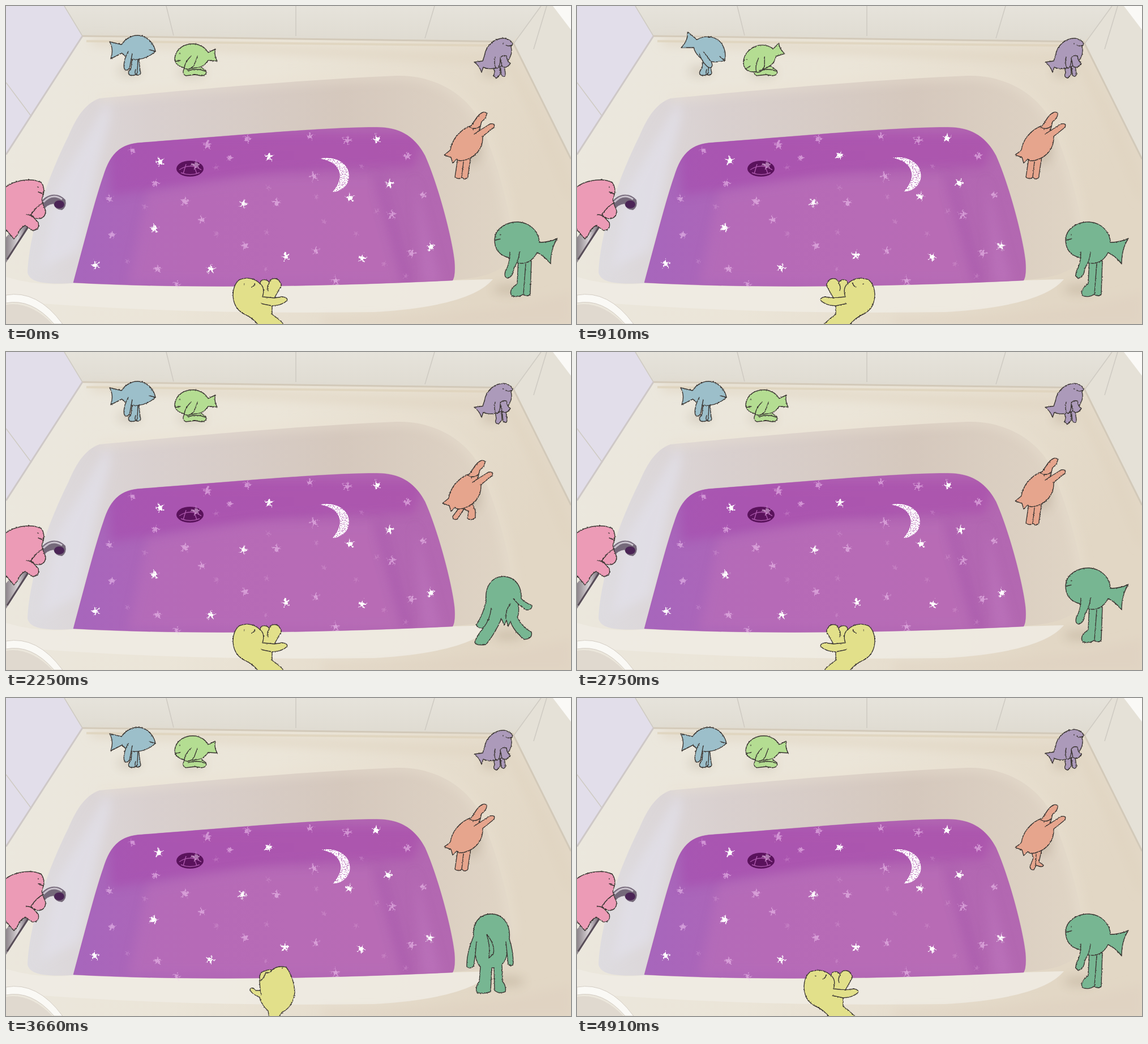
These frames come from a looping animation (998x561 px, 5000 ms). An HTML page:

```html
<!DOCTYPE html>
<html lang="en">
<head>
<meta charset="utf-8">
<title>Fish bath</title>
<style>
  html, body { margin: 0; width: 100%; height: 100%; overflow: hidden; background: #e9e3d5 }
  svg { display: block; width: 100%; height: 100% }
  .fish { stroke: #3b3633; stroke-width: 1.4; stroke-linejoin: round; stroke-linecap: round; filter: url(#rough) }
  .l { fill: none }
  .soft { filter: url(#blur) }
  .grout { fill: none; stroke: #cfcbc3; stroke-width: 1.6 }
</style>
</head>
<body>
<svg viewBox="0 0 998 561" preserveAspectRatio="none">
  <defs>
    <filter id="rough"><feTurbulence id="boil" type="fractalNoise" baseFrequency=".4" result="n"/><feDisplacementMap in="SourceGraphic" in2="n" scale="2.8" xChannelSelector="R" yChannelSelector="G"/></filter>
    <filter id="still"><feTurbulence type="fractalNoise" baseFrequency=".3" result="n"/><feDisplacementMap in="SourceGraphic" in2="n" scale="8" xChannelSelector="R" yChannelSelector="G"/></filter>
    <filter id="scribble"><feTurbulence id="wobble" type="fractalNoise" baseFrequency=".3" result="n"/><feDisplacementMap in="SourceGraphic" in2="n" scale="8" xChannelSelector="R" yChannelSelector="G"/></filter>
    <filter id="chalk" color-interpolation-filters="sRGB"><feTurbulence id="grain" type="fractalNoise" baseFrequency=".55"/><feColorMatrix values="0 0 0 0 1  0 0 0 0 1  0 0 0 0 1  7 0 0 0 -2.3"/><feComposite in2="SourceGraphic" operator="in"/></filter>
    <filter id="blur" x="-30%" y="-30%" width="160%" height="160%"><feGaussianBlur stdDeviation="9"/></filter>
    <linearGradient id="rim" x2="1" y2=".25"><stop stop-color="#ebe8df"/><stop offset=".5" stop-color="#ebe5d8"/><stop offset="1" stop-color="#e2d7c5"/></linearGradient>
    <linearGradient id="tub"><stop stop-color="#dedce0"/><stop offset=".25" stop-color="#d9d0cf"/><stop offset=".65" stop-color="#d5c8bd"/><stop offset="1" stop-color="#e0d5c5"/></linearGradient>
    <linearGradient id="water"><stop stop-color="#a766bc"/><stop offset=".35" stop-color="#b065b6"/><stop offset="1" stop-color="#b368b1"/></linearGradient>
    <linearGradient id="wall" y2="1" x2="0"><stop stop-color="#e6e3db"/><stop offset="1" stop-color="#dfdbd1"/></linearGradient>
    <linearGradient id="metal"><stop stop-color="#8d858b"/><stop offset=".5" stop-color="#d8d3d6"/><stop offset="1" stop-color="#5e5260"/></linearGradient>
    <path id="pool" d="M119,488C140,410 158,340 172,300C183,265 198,243 240,241C400,229 560,214 655,214C700,214 724,234 740,264C763,315 788,410 792,450Q794,475 789,484C560,495 320,499 119,488Z"/>
    <clipPath id="inPool"><use href="#pool"/></clipPath>
  </defs>

  <rect width="998" height="561" fill="url(#rim)"/>
  <path d="M100,0H960L895,63L135,53Z" fill="url(#wall)"/>
  <path d="M0,0H103L135,53L0,262Z" fill="#e2deea"/>
  <path d="M945,0H998V270L897,66Z" fill="#e5e1d7"/>
  <path d="M966,0H998V42Z" fill="#faf9f6"/>
  <path class="grout" d="M283,0L296,52M512,0V53M757,0L740,57M945,0L897,66M932,76L955,0M0,135L45,195M103,0L135,53"/>
  <path d="M135,53L895,63L998,270" fill="none" stroke="#d2c9b9" stroke-width="3"/>
  <path d="M135,53L0,262" fill="none" stroke="#cec8c7" stroke-width="3"/>
  <path d="M150,63C300,66 700,88 885,96C920,150 960,240 998,340" fill="none" stroke="#dfd3bf" stroke-width="9" class="soft"/>
  <path d="M142,62L880,70" stroke="#ded2ba" stroke-width="4" opacity=".7"/>
  <path d="M165,163C300,150 520,130 690,123C750,121 808,150 836,200C866,270 892,360 895,420C895,462 860,478 795,483L119,489C75,491 42,490 38,470C40,420 60,330 110,230C125,195 140,172 165,163Z" fill="url(#tub)"/>
  <path d="M165,163C300,150 520,130 690,123C750,121 808,150 836,200C866,270 892,360 895,420" fill="none" stroke="#eae1d2" stroke-width="7" class="soft"/>
  <path d="M180,165L185,195L160,290L130,430L60,465L90,320Z" fill="#e2e0e9" opacity=".75" class="soft"/>
  <path d="M0,478Q60,496 119,489C320,499 560,495 789,484L860,482Q820,530 650,540Q300,545 0,520Z" fill="#f0ede4" opacity=".85"/>
  <path d="M560,552Q820,555 998,505V561H560Z" fill="#e0d3c2" class="soft"/>

  <use href="#pool" fill="url(#water)"/>
  <g clip-path="url(#inPool)">
    <path d="M180,225H740L720,285Q480,285 250,325L185,335Z" fill="#a441a8" opacity=".42" class="soft"/>
    <path d="M250,330L440,300L655,300L700,490H215Z" fill="#be72b9" opacity=".45" class="soft"/>
    <path d="M655,300L710,490" fill="none" stroke="#a553ab" stroke-width="12" opacity=".5" class="soft"/>
    <path d="M720,300L770,490H735Z" fill="#bd76bd" opacity=".6" class="soft"/>
  </g>
  <use href="#pool" fill="none" stroke="#a247a9" opacity=".4"/>
  <ellipse cx="325" cy="287" rx="24" ry="14" fill="#5a125c"/>
  <path d="M306,289Q325,276 345,289M309,294Q325,301 342,294M318,279L313,296M331,278L337,296" fill="none" stroke="#a855a8" stroke-width="1.5"/>
  <g id="faint" fill="#f3c8f2" filter="url(#still)"></g>
  <g id="bright" fill="#fff" filter="url(#scribble)"></g>
  <g filter="url(#chalk)"><path id="moon" fill="#fff" d="M555,269C580,264 606,276 606,300C606,316 592,328 577,328C590,312 594,298 585,285C578,275 567,272 555,269Z"/></g>

  <g fill="#806a50" opacity=".22" class="soft">
    <ellipse cx="218" cy="115" rx="20" ry="8"/><ellipse cx="328" cy="117" rx="24" ry="8"/><ellipse cx="858" cy="116" rx="18" ry="8"/>
    <ellipse cx="822" cy="254" rx="15" ry="26"/><ellipse cx="888" cy="500" rx="28" ry="8"/>
  </g>
  <path d="M0,510Q55,500 100,561H85Q45,515 0,524Z" fill="#faf9f5" stroke="#d3ccc3"/>
  <path d="M0,527Q42,520 82,561H0Z" fill="#e0d9cf"/>
  <path d="M0,408L30,375L42,388L0,453Z" fill="url(#metal)"/>
  <path d="M40,388L2,447" stroke="#574c57" stroke-width="3"/>
  <path d="M58,352C68,330 92,327 105,342Q108,354 99,360Q87,360 84,349Q71,350 66,362Z" fill="#75697a"/>
  <path d="M66,346Q82,329 99,341" fill="none" stroke="#c9c2cc" stroke-width="3"/>
  <ellipse cx="94" cy="350" rx="9" ry="7" fill="#4b2456"/>

  <g id="pink" class="fish" fill="#ec9bb6">
    <path d="M-6,324C12,306 45,303 62,311Q69,320 66,333C60,343 66,350 70,361Q70,373 60,375Q52,377 44,368L57,382Q60,395 47,396L34,387Q24,392 20,404L14,411L-6,388Z"/>
    <path class="l" d="M66,332L57,328M57,319v1M66,347Q55,352 44,368M36,368Q44,368 46,372"/>
  </g>

  <g id="blue" class="fish" fill="#9cbfca">
    <path d="M223,88L221,109Q213,119 219,122Q228,124 232,118L233,90ZM229,112Q226,121 232,122Q240,122 237,114L234,90"/>
    <g><path d="M204,68C214,53 232,48 246,55Q261,64 264,80C254,89 241,96 222,94Q210,90 205,83L185,93Q191,77 183,63Z"/>
    <path class="l" d="M264,80L253,77M257,66v1"/></g>
    <path d="M216,80C208,94 206,110 211,113Q217,114 219,106L223,84"/>
  </g>

  <g id="lime" class="fish" fill="#b4dd92">
    <path d="M316,108Q309,120 318,123L334,121L345,123Q356,122 353,114L342,106Z"/>
    <g><path d="M298,92C300,75 316,65 335,67Q350,70 357,82L370,76Q367,86 373,97L357,96C351,105 345,108 335,109C315,112 298,107 298,92Z"/>
    <path class="l" d="M299,98L308,96M307,83v1"/>
    <path d="M327,88Q315,100 315,110Q323,115 332,105L338,89"/></g>
    <path class="l" d="M322,114Q338,109 352,115"/>
  </g>

  <g id="purple" class="fish" fill="#ac9aba">
    <path d="M861,104L863,118Q859,126 867,127L873,120L872,100ZM873,102L875,122Q882,128 882,119L879,98Z"/>
    <g><path d="M845,88C848,68 865,56 880,57Q892,59 895,67L892,72Q895,82 890,91C884,103 874,108 862,110Q851,112 843,108L840,117Q836,105 827,99L842,97Z"/>
    <path class="l" d="M894,69Q888,72 883,69M878,66v1"/>
    <path d="M864,90Q861,106 867,110Q873,108 873,94M873,92L876,106Q884,112 891,101Q885,98 884,88Q876,86 873,92"/></g>
  </g>

  <g id="coral" class="fish" fill="#e6a58d">
    <g><path d="M798,268L793,302Q800,307 805,302L809,305Q817,305 816,299L821,265Z"/><path class="l" d="M808,275L805,302"/></g>
    <g><path d="M802,268L806,281L800,297Q801,303 807,302L811,294Q823,299 824,294L816,288L821,266Z"/><path class="l" d="M811,275L810,294"/></g>
    <g transform="translate(3 -5)"><path d="M798,262L799,278L789,291Q789,298 797,296L809,278L817,282L815,295Q824,299 829,293L829,281L821,262Z"/></g>
    <g>
      <path d="M822,211L832,196Q843,183 849,189Q850,197 840,204L836,220L855,208Q865,206 862,214L842,230C843,250 831,264 816,270Q801,276 796,270L789,277L786,267L774,263L785,254C787,237 801,218 822,211Z"/>
      <path class="l" d="M818,213Q827,220 838,212M825,217v1M836,220L827,226"/>
    </g>
  </g>

  <g id="green" class="fish" fill="#77b692">
    <g>
      <path d="M905,445L903,490Q887,501 893,511Q904,515 913,509Q922,514 926,508L928,450Z"/><path class="l" d="M914,508L918,455"/>
      <path d="M863,412C864,392 885,380 905,381C930,383 942,402 942,417Q960,417 974,410Q962,428 962,455Q950,440 938,435Q930,450 918,453Q902,457 888,444C872,440 863,430 863,412Z"/>
      <path class="l" d="M864,413L873,411M873,403v1"/>
      <path d="M890,434Q890,455 882,468Q879,480 887,480Q896,477 897,463Q906,449 907,434"/>
    </g>
    <g>
      <path d="M826,420Q813,450 814,474Q820,479 826,473L829,452Q831,468 838,474L836,500Q828,510 832,520Q845,523 856,518L858,476H862L863,516Q872,523 882,518Q884,508 877,500L876,470Q884,462 885,450L887,470Q893,475 896,469Q896,445 889,425C892,400 878,381 857,381C835,381 824,398 826,420Z"/>
      <path class="l" d="M849,417Q856,438 853,459L861,451Q864,434 849,417M829,452L831,430M885,450L883,430"/>
    </g>
    <g>
      <path d="M868,440C861,410 885,394 905,395C930,397 942,412 945,438Q955,450 967,445Q950,460 950,479Q938,470 927,462L924,480Q932,496 919,503Q906,505 905,493L905,479Q885,495 862,508Q847,510 849,500Q865,490 880,467Q862,477 849,477Q843,470 850,465Q866,457 880,446Z"/>
      <path class="l" d="M867,429L879,431M876,419v1M880,467Q897,458 905,443M905,479L915,465"/>
    </g>
    <g>
      <path d="M848,440C845,412 860,395 880,396C905,398 911,420 910,435Q918,443 929,447Q930,455 919,455L905,445Q907,462 903,468Q912,486 928,494Q931,506 915,507Q895,490 891,475L887,484L884,473L880,482L875,470Q867,492 848,516Q830,519 828,512Q832,500 843,487Q832,488 831,481Q842,465 848,440Z"/>
      <path class="l" d="M883,470Q882,455 891,444M896,435L905,445M843,487Q855,472 857,452"/>
    </g>
  </g>

  <g id="yellow" class="fish" fill="#e2e08a">
    <g>
      <path d="M412,483C426,477 440,481 449,490Q449,482 458,483Q464,484 465,489Q466,480 476,481Q482,482 483,486Q488,490 485,496L474,515L489,513Q499,515 496,520Q488,528 470,529L470,544Q482,552 492,563H446Q436,550 418,542C397,529 396,496 412,483Z"/>
      <path class="l" d="M449,490Q458,497 453,513L474,515M465,489Q460,495 463,502M470,529L451,525M421,490v1M434,496Q439,494 440,489"/>
    </g>
    <g>
      <path d="M448,500Q446,484 456,482Q463,478 470,480Q480,471 495,475Q509,494 510,520Q506,546 488,554L481,564H465L463,552Q450,540 448,528Q432,521 431,514Q435,508 441,516L449,516Z"/>
      <path class="l" d="M448,500Q456,495 459,484M459,484Q464,487 470,480M488,476v1M449,516L451,523"/>
    </g>
  </g>
</svg>
<script>
const LOOP = 5000, FRAMES = 60, CYCLE = 30;
const $ = id => document.getElementById(id);
const move = (el, value) => el.setAttribute('transform', value);

function star(parent, x, y, size, opacity, turn) {
  const p = document.createElementNS('http://www.w3.org/2000/svg', 'path');
  let d = '';
  for (let i = 0; i < 10; i++) {
    const a = i * Math.PI / 5 - Math.PI / 2, r = i % 2 ? size * .32 : size;
    d += (i ? 'L' : 'M') + (r * Math.cos(a)).toFixed(1) + ',' + (r * Math.sin(a)).toFixed(1);
  }
  p.setAttribute('d', d + 'Z');
  p.setAttribute('opacity', opacity);
  move(p, `translate(${x} ${y}) rotate(${turn})`);
  parent.append(p);
  return p;
}

const glow = [[223,255],[356,245],[426,234],[537,230],[602,237],[709,265],[395,268],[336,281],[264,313],[183,340],[316,345],[346,377],[187,404],[544,301],[478,347],[737,333],[682,368],[422,423],[547,432],[716,436],[268,464],[302,492],[582,485]];
const dim = [[371,285],[245,354],[463,320],[628,283],[562,380],[655,362],[461,399],[372,402],[618,402],[706,476],[668,455],[459,464],[214,450],[548,337]];
const white = [[272,275],[465,266],[655,235],[677,314],[608,338],[419,349],[262,393],[158,457],[362,464],[494,442],[629,445],[750,425]];
glow.forEach(([x, y], i) => star($('faint'), x, y, 8 + i * 5 % 3, .55, i * 17 % 36 - 18));
dim.forEach(([x, y], i) => star($('faint'), x, y, 6.5, .2, i * 13 % 36));
const sparkles = white.map(([x, y], i) => ({ x, y, i, el: star($('bright'), x, y, 9.5, 1, 0) }));

const jitter = [[0, 0], [-.5, -1], [-1.5, -2]];
const show = (group, visible) => [...group.children].forEach((el, i) => el.style.display = visible.includes(i) ? '' : 'none');

function pose(n) {
  const k = n % CYCLE, b = n % 3, [dx, dy] = jitter[b];
  for (const id of ['boil', 'wobble', 'grain']) $(id).setAttribute('seed', b + 2);
  for (const { x, y, i, el } of sparkles)
    move(el, `translate(${x + dx} ${y + dy}) rotate(${i * 23 % 40 - 20 + b * 9})`);
  move($('moon'), `translate(${b * .8} ${-b * .3}) rotate(${b} 582 298)`);

  const bow = k > 5 && k < 14 ? Math.sin((k - 5) / 9 * Math.PI) : 0;
  const [, blueBody, blueArm] = $('blue').children;
  move(blueBody, `translate(0 ${-2 * bow}) rotate(${30 * bow} 223 82)`);
  move(blueArm, `rotate(${-55 * bow} 219 82)`);
  move($('lime').children[1], `translate(${-6 * bow} ${3 * bow}) rotate(${-24 * bow} 330 92)`);
  move($('purple').lastElementChild, `translate(0 ${k === 3 || k > 15 ? -1.5 : 0})`);
  move($('purple').firstElementChild, `translate(${k > 15 && k < 28 ? 3 : 0} 0)`);
  move($('pink'), `translate(0 ${k === 14 || k === 29 ? -.5 : 0})`);

  const crouch = k > 16 && k < 28, bend = k > 14 && !crouch;
  show($('coral'), [crouch ? 2 : bend ? 1 : 0, 3]);
  move($('coral'), crouch ? 'translate(-3 4)' : bend ? 'translate(0 1)' : '');

  show($('green'), [k < 12 || k === 29 ? 0 : k < 20 ? 1 : k === 20 ? 2 : 3]);

  const turning = k === 1 || k === 2 || (k > 12 && k < 16);
  show($('yellow'), [turning ? 1 : 0]);
  move($('yellow'), k > 0 && k < 13 ? 'translate(927 0) scale(-1 1)' : '');
}

let last = -1;
function tick(now) {
  const t = Math.floor(now % LOOP / 10) * 10;
  const n = Math.floor((t + 9) * FRAMES / LOOP) % FRAMES;
  if (n !== last) pose(last = n);
  requestAnimationFrame(tick);
}
pose(0);
requestAnimationFrame(tick);
</script>
</body>
</html>
```
